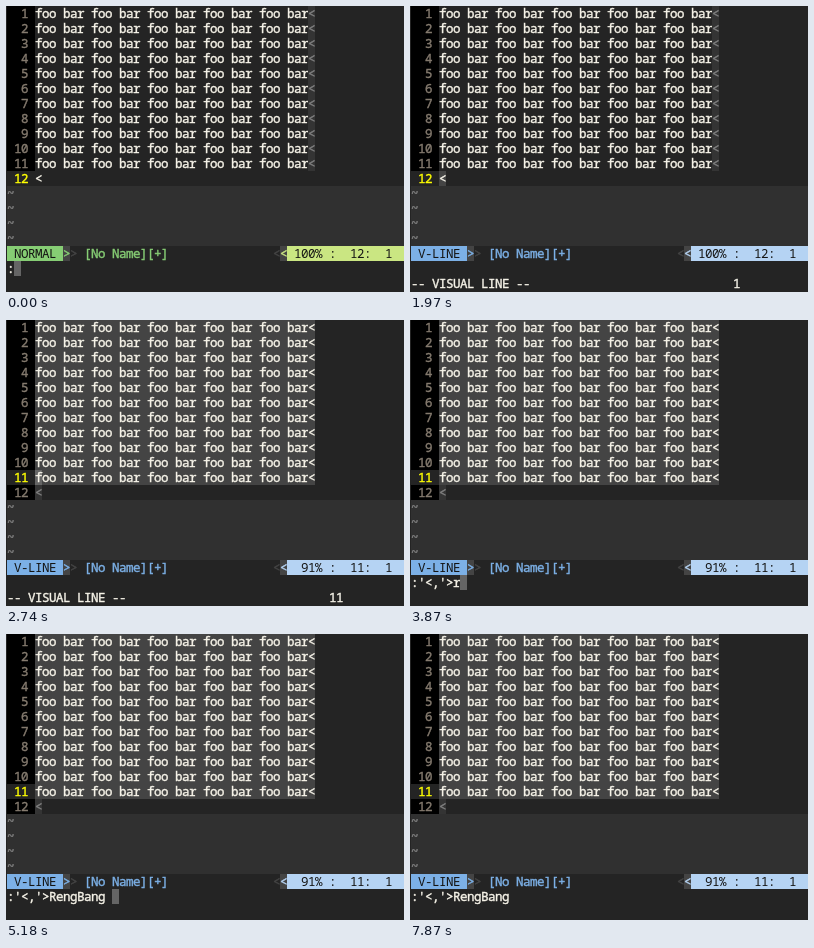
Recreate the animation shown at these times as an HTML page. Size 398x286 px, loop 8000 ms.

```html
<!DOCTYPE html>
<html lang="en">
<head>
<meta charset="utf-8">
<title>Editor session</title>
<style>
  html, body { margin: 0; width: 100%; height: 100%; overflow: hidden; background: #242424; }
  #screen {
    position: relative; width: 398px; height: 286px; overflow: hidden; background: #242424;
    font: 12.5px/15px "Noto Sans Mono", "DejaVu Sans Mono", monospace;
    letter-spacing: -0.5px; font-variant-ligatures: none;
  }
  #screen span { position: absolute; height: 15px; white-space: pre; -webkit-text-stroke: 0.4px; }
  #screen span.thin { -webkit-text-stroke: 0; }
</style>
</head>
<body>
<div id="screen"></div>
<script>
const LOOP = 8000, CELL_W = 7, CELL_H = 15, LEFT = 1, WIDE = 57;
const FG = '#f6f3e8', BG = '#242424', DIM = '#808080', SELECTED = '#444444';
const CURSOR = '#656565', SEPARATOR = '#444444', INK = '#141413';
const THEMES = {
  NORMAL: { strong: '#86cd74', light: '#cae682' },
  visual: { strong: '#7cb0e6', light: '#b5d3f3' }
};
const LINE = 'foo bar '.repeat(5).trim();
const RANGE = ":'<,'>";
const screen = document.getElementById('screen');

// Each step changes only the listed fields; cursor is 'text', 'cmd' or ''.
const steps = [
  [0, { mode: 'NORMAL', line: 12, selected: [], message: '', pending: '', cmd: ':', cursor: 'cmd' }],
  [230, { cmd: '', cursor: 'text' }],
  [950, { cursor: '' }],
  [1010, { cursor: 'text', message: 'VISUAL' }],
  [1070, { mode: 'VISUAL', pending: '1' }],
  [1190, { pending: 'i' }],
  [1250, { mode: 'V-LINE', message: 'VISUAL LINE', pending: '1', selected: [12, 12] }],
  [1970, { cursor: '' }],
  [2140, { cursor: 'text', message: '', pending: '', selected: [] }],
  [2200, { mode: 'NORMAL' }],
  [2380, { line: 11 }],
  [2620, { mode: 'VISUAL', message: 'VISUAL', pending: '1' }],
  [2680, { pending: 'i' }],
  [2740, { mode: 'V-LINE', message: 'VISUAL LINE', pending: '11', selected: [1, 11] }],
  [3460, { cursor: '' }],
  [3510, { message: '', pending: '', cmd: RANGE, cursor: 'cmd' }],
  ...[3870, 3930, 4050, 4290, 4520, 4580, 4700, 4880].map(
    (time, i) => [time, { cmd: RANGE + 'rengbang'.slice(0, i + 1) }]),
  [5180, { cmd: RANGE + 'RengBang ' }],
  ...[5900, 6140, 6560, 6800, 7220, 7450, 7870].map(
    (time, i) => [time, { cursor: i % 2 ? 'cmd' : '' }])
];

let merged = {};
const states = steps.map(([time, change]) => (merged = { ...merged, ...change, time }));

function put(row, col, text, color = FG, background = '', width = text.length) {
  const span = document.createElement('span');
  span.textContent = text;
  span.className = color === INK ? 'thin' : '';
  Object.assign(span.style, {
    left: LEFT + col * CELL_W + 'px', top: row * CELL_H + 'px',
    width: width * CELL_W + 'px', color, background
  });
  screen.append(span);
}

function drawLine(number, state) {
  const row = number - 1, current = number === state.line;
  const [first, last] = state.selected;
  const chosen = number >= first && number <= last;
  const text = number < 12 ? LINE : '';
  const label = String(number).padStart(3) + ' ';
  put(row, 0, label, current ? '#ffff00' : '#857b6f', current ? BG : '#000');
  if (text) put(row, 4, text, FG, chosen ? SELECTED : '');
  const bright = chosen || (current && !text);
  put(row, 4 + text.length, '<', bright ? FG : DIM, chosen ? SELECTED : bright ? '' : '#343434');
  if (current && state.cursor === 'text') put(row, 4, text[0] || '<', FG, CURSOR);
}

function drawStatus({ mode, line }) {
  const { strong, light } = THEMES[mode] || THEMES.visual;
  const percent = Math.floor(line / 12 * 100) + '%';
  put(16, 0, ` ${mode} `, INK, strong);
  put(16, 8, '>', strong, SEPARATOR);
  put(16, 9, '>', SEPARATOR);
  put(16, 11, '[No Name][+]', strong);
  put(16, 38, '<', SEPARATOR);
  put(16, 39, '<', light, SEPARATOR);
  put(16, 40, ` ${percent.padStart(4)} :  ${line}:  1 `, INK, light, WIDE - 40);
}

function draw(state) {
  screen.replaceChildren();
  for (let number = 1; number <= 12; number++) drawLine(number, state);
  for (let row = 12; row < 16; row++) put(row, 0, '~', DIM, '#303030', WIDE);
  drawStatus(state);
  put(17, 0, state.cmd);
  if (state.cursor === 'cmd') put(17, state.cmd.length, ' ', FG, CURSOR);
  if (state.message) put(18, 0, `-- ${state.message} --`);
  put(18, 46, state.pending);
}

let shown;
const start = performance.now();
function tick(now) {
  const time = Math.max(0, now - start) % LOOP;
  const state = states.findLast(s => s.time <= time);
  if (state !== shown) draw(shown = state);
  requestAnimationFrame(tick);
}
tick(start);
</script>
</body>
</html>
```
